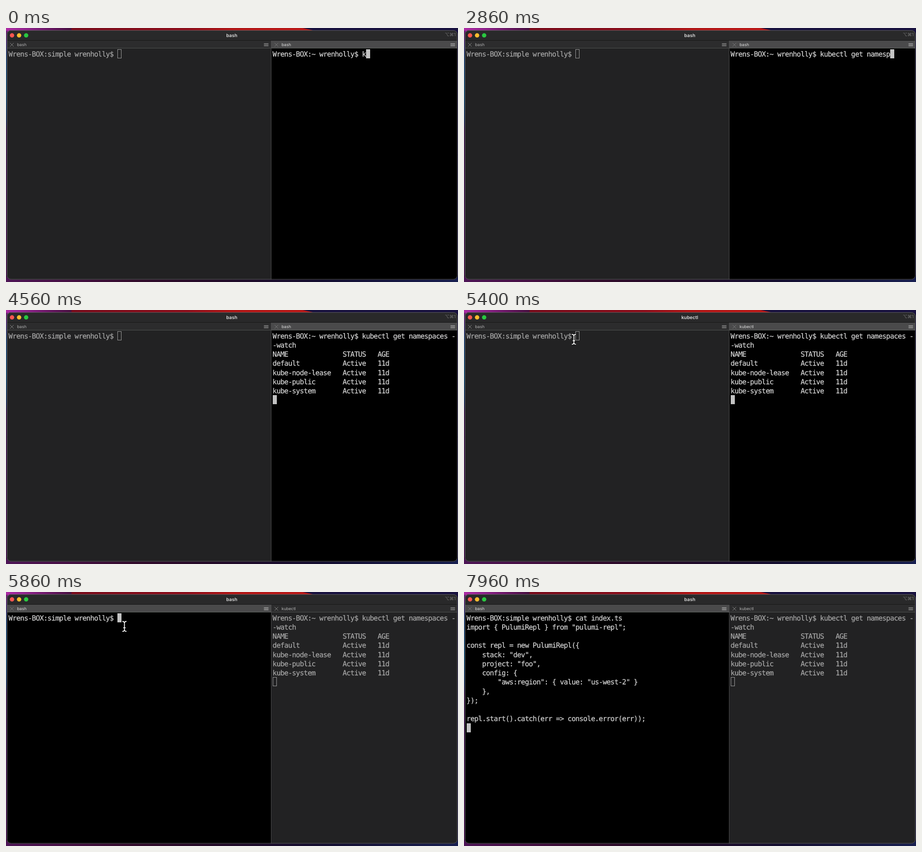
These frames come from a looping animation (998 px wide and 561 px high, 8000 ms). An HTML page with a canvas:

```html
<!DOCTYPE html>
<html lang="en">
<head>
<meta charset="utf-8">
<title>Terminal</title>
<style>
  html, body { margin: 0; width: 100%; height: 100%; overflow: hidden; background: #17123c; }
  canvas { display: block; }
</style>
</head>
<body>
<canvas id="stage" width="998" height="561"></canvas>
<script>
const ctx = document.getElementById('stage').getContext('2d');
const LOOP = 8000, CELL = 8.587, ROW = 20.25, SPLIT = 585;
const MONO = '15.6px "DejaVu Sans Mono", monospace';
const UI = 'Inter, "Liberation Sans", sans-serif';

// Each group is [first time, last time, number of evenly spaced steps].
const spread = groups => groups.flatMap(([a, b, n]) =>
  Array.from({ length: n }, (_, i) => n > 1 ? a + (b - a) * i / (n - 1) : a));
const typed = (text, times, t) => text.slice(0, times.filter(x => x <= t).length);

const rightKeys = spread([[0, 0, 1], [130, 200, 2], [360, 360, 1], [560, 560, 1], [730, 860, 3],
  [1100, 1360, 4], [1900, 2130, 4], [2660, 2660, 1], [2860, 3060, 3], [3260, 3460, 3],
  [3600, 3960, 5], [4130, 4200, 2]]);
const leftKeys = spread([[6190, 6730, 7], [6900, 6900, 1], [7060, 7100, 2], [7330, 7400, 2]]);

const namespaces = `NAME              STATUS   AGE
default           Active   11d
kube-node-lease   Active   11d
kube-public       Active   11d
kube-system       Active   11d
`;
const listing = `import { PulumiRepl } from "pulumi-repl";

const repl = new PulumiRepl({
    stack: "dev",
    project: "foo",
    config: {
        "aws:region": { value: "us-west-2" }
    },
});

repl.start().catch(err => console.error(err));
`;

function leftText(t) {
  return 'Wrens-BOX:simple wrenholly$ ' + typed('cat index.ts', leftKeys, t) +
    (t >= 7960 ? '\n' + listing : '');
}
function rightText(t) {
  return 'Wrens-BOX:~ wrenholly$ ' + typed('kubectl get namespaces --watch', rightKeys, t) +
    (t >= 4360 ? '\n' : '') + (t >= 4560 ? namespaces : '');
}

function rect(x, y, w, h, color) {
  ctx.fillStyle = color;
  ctx.fillRect(x, y, w, h);
}
function label(text, x, y, font, color, align = 'left') {
  ctx.font = font;
  ctx.fillStyle = color;
  ctx.textAlign = align;
  ctx.fillText(text, x, y);
}
function gradient(x, y, w, h, stops) {
  const g = ctx.createLinearGradient(x, y, w > h ? x + w : x, w > h ? y : y + h);
  stops.forEach(([at, color]) => g.addColorStop(at, color));
  rect(x, y, w, h, g);
}

function desktop() {
  gradient(0, 0, 998, 280, [[0, '#ad2ca4'], [.05, '#8a2187'], [.1, '#651660'], [.144, '#481040'],
    [.146, '#780c1c'], [.4, '#8c0f1c'], [.5, '#b01717'], [.63, '#b81918'], [1, '#b81918']]);
  ctx.fillStyle = '#19123f';
  ctx.beginPath();
  ctx.moveTo(655, 0);
  ctx.lineTo(998, 0);
  ctx.lineTo(998, 561);
  ctx.lineTo(690, 561);
  ctx.lineTo(682, 6);
  ctx.fill();
  gradient(0, 6, 4, 549, [[0, '#712476'], [.1, '#22406f'], [.25, '#154a6c'], [.36, '#1c3059'],
    [.4, '#3a1748'], [1, '#431249']]);
  gradient(0, 550, 998, 11, [[0, '#4d1556'], [.12, '#471046'], [.28, '#330c2c'], [.45, '#240b28'],
    [.7, '#140e30'], [1, '#181f50']]);
}

function pane(x, w, text, lit) {
  rect(x, 45, w, 511, lit ? '#000' : '#222223');
  ctx.font = MONO;
  ctx.textAlign = 'center';
  ctx.fillStyle = ctx.strokeStyle = lit ? '#d3d3d3' : '#a6a6a6';
  ctx.lineWidth = .25;
  const left = x + 3.5, cols = Math.floor((w - 6) / CELL);
  let col = 0, row = 0;
  for (const ch of text) {
    if (ch === '\n') { col = 0; row++; continue; }
    const cx = left + (col + .5) * CELL, base = 62.7 + row * ROW;
    ctx.fillText(ch, cx, base);
    ctx.strokeText(ch, cx, base);
    if (++col === cols) { col = 0; row++; }
  }
  const cx = Math.floor(left + col * CELL), cy = Math.floor(47 + row * ROW);
  if (lit) rect(cx, cy, 9, 20, '#c3c3c3');
  else {
    ctx.strokeStyle = '#a0a0a0';
    ctx.lineWidth = 1;
    ctx.strokeRect(cx + .5, cy + .5, 8, 19);
  }
}

function tab(x, w, name, lit) {
  rect(x, 28, w, 16, lit ? '#4a4a4b' : '#2c2c2d');
  rect(x, 44, w, 1, lit ? '#626663' : '#505351');
  const cx = x + 11;
  ctx.strokeStyle = lit ? '#777' : '#858585';
  ctx.lineWidth = 1;
  ctx.beginPath();
  ctx.moveTo(cx - 4, 33); ctx.lineTo(cx + 4, 41);
  ctx.moveTo(cx + 4, 33); ctx.lineTo(cx - 4, 41);
  ctx.stroke();
  label(name, x + 22.5, 40, '9px ' + UI, lit ? '#e0e0e0' : '#b4b4b4');
  for (const y of [34, 36.5, 39]) rect(x + w - 15.5, y, 10, 1, lit ? '#bdbdbd' : '#a8a8a8');
}

function pointer(t) {
  // Sweeps down and left, then settles below the prompt.
  const k = Math.min(1, (t - 5260) / 270), e = 1 - (1 - k) ** 2;
  const mix = (a, b, c, d) =>
    a * (1 - e) ** 3 + 3 * b * e * (1 - e) ** 2 + 3 * c * e * e * (1 - e) + d * e ** 3;
  ctx.save();
  ctx.translate(mix(356, 270, 210, 261.5), mix(10, 30, 64, 76));
  ctx.beginPath();
  for (const s of [-1, 1]) {
    ctx.moveTo(-4.5, s * 11);
    ctx.quadraticCurveTo(0, s * 11, 0, s * 7);
    ctx.quadraticCurveTo(0, s * 11, 4.5, s * 11);
  }
  ctx.moveTo(0, -8); ctx.lineTo(0, 8);
  ctx.moveTo(-2.5, 3); ctx.lineTo(2.5, 3);
  for (const [width, color] of [[3.4, '#000'], [1.8, '#fff']]) {
    ctx.lineWidth = width;
    ctx.strokeStyle = color;
    ctx.stroke();
  }
  ctx.restore();
}

function draw(t) {
  desktop();
  const leftTab = t >= 5830, leftLit = t >= 5860;
  ctx.save();
  ctx.beginPath();
  ctx.roundRect(2, 5, 995, 550.5, 9);
  ctx.fillStyle = '#000';
  ctx.fill();
  ctx.clip();
  rect(2, 5, 995, 23, '#29292a');
  rect(2, 27, 995, 1, '#171717');
  ['#fc5650', '#fdbc2e', '#29c840'].forEach((color, i) => {
    ctx.fillStyle = color;
    ctx.beginPath();
    ctx.arc(13.3 + i * 15.6, 16.3, 4.8, 0, 7);
    ctx.fill();
  });
  label(t >= 4830 && !leftTab ? 'kubectl' : 'bash', 498.5, 19.5, '600 10.3px ' + UI, '#dedede', 'center');
  label('⌥⌘1', 993, 18, '10px Inter, "DejaVu Sans", sans-serif', '#777', 'right');
  pane(2.5, SPLIT - 2.5, leftText(t), leftLit);
  pane(SPLIT + .5, 997 - SPLIT, rightText(t), !leftLit);
  tab(2, SPLIT - 2, 'bash', leftTab);
  tab(SPLIT + 1, 997 - SPLIT - 1, t >= 4860 ? 'kubectl' : 'bash', !leftTab);
  rect(SPLIT, 28, 1, 528, '#4d4d4d');
  ctx.restore();
  ctx.strokeStyle = '#5c5c5e';
  ctx.lineWidth = 1;
  ctx.beginPath();
  ctx.roundRect(2.5, 5.5, 994, 549.5, 8.5);
  ctx.stroke();
  if (t >= 5260 && t < 6160) pointer(t);
}

ctx.textRendering = 'geometricPrecision';
function frame() {
  draw(performance.now() % LOOP);
  requestAnimationFrame(frame);
}
frame();
</script>
</body>
</html>
```
